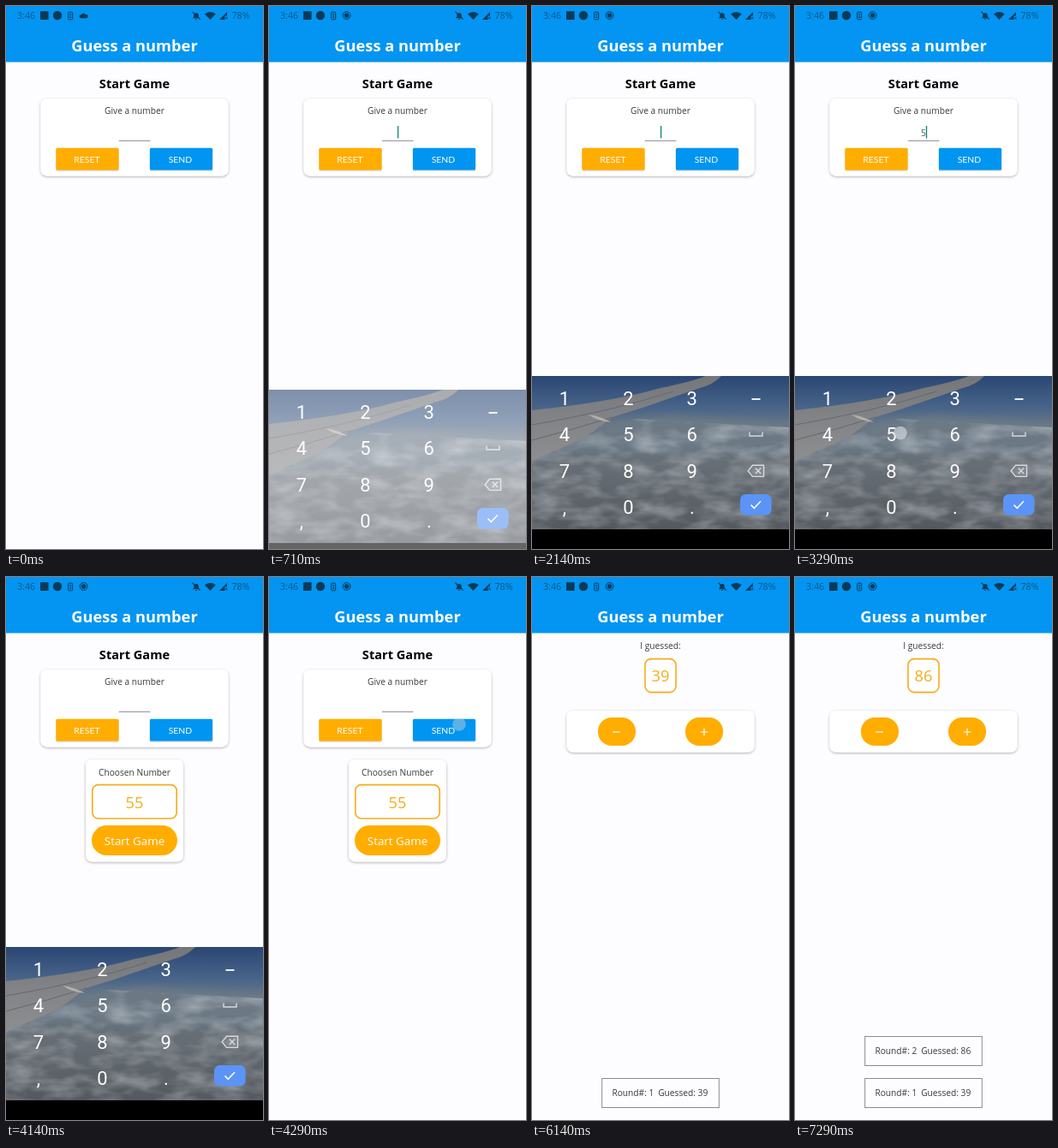
An HTML page for the animation above (8 s loop, 300 by 634 pixels).

```html
<!DOCTYPE html>
<html lang="en">
<head>
<meta charset="utf-8">
<title>Guess a number</title>
<style>
  html, body { margin: 0; width: 100%; height: 100%; overflow: hidden; background: #fdfcfe; }
  svg { display: block; width: 100%; height: 100%; }
  text { font-family: "Open Sans", "Noto Sans", sans-serif; font-size: 10.2px; fill: #3a3a3a; text-anchor: middle; }
  .start { text-anchor: start; }
  .title { font-size: 18.3px; font-weight: 700; fill: #fff; }
  .head { font-size: 14.6px; font-weight: 700; fill: #000; }
  .btn { font-family: Lato, sans-serif; font-size: 10.4px; fill: #fff; }
  .big { font-size: 18.3px; fill: #f5ac1c; }
  .pill { font-size: 13.4px; fill: #fff; }
  .key { font-family: Roboto, sans-serif; font-size: 22px; fill: #fff; }
  .bar { font-size: 10.7px; fill: #0a5688; }
  .card { fill: #fff; filter: url(#lift); }
  .flat { filter: url(#low); }
  .frame { fill: #fff; stroke: #f5ac1c; stroke-width: 1.6; }
  .entry { fill: #fdfcfe; stroke: #8c8c8c; stroke-width: 1; }
</style>
</head>
<body>
<svg viewBox="0 0 300 634" xmlns="http://www.w3.org/2000/svg">
  <defs>
    <filter id="lift" x="-10%" y="-20%" width="120%" height="150%">
      <feDropShadow dx="0" dy="1" stdDeviation="1.5" flood-color="#000" flood-opacity=".33"/>
    </filter>
    <filter id="low" x="-10%" y="-20%" width="120%" height="160%">
      <feDropShadow dx="0" dy=".8" stdDeviation=".7" flood-color="#000" flood-opacity=".3"/>
    </filter>
    <filter id="soft" x="-30%" y="-60%" width="160%" height="220%"><feGaussianBlur stdDeviation="4"/></filter>
    <filter id="fluff" x="0" y="0" width="100%" height="100%">
      <feTurbulence type="fractalNoise" baseFrequency=".025 .06" numOctaves="3" seed="4"/>
      <feColorMatrix values="0 0 0 0 .72  0 0 0 0 .75  0 0 0 0 .78  1.6 0 0 0 -.6"/>
      <feComposite in2="SourceGraphic" operator="in"/>
    </filter>
    <linearGradient id="sky" x1="0" y1="0" x2="0" y2="1">
      <stop offset="0" stop-color="#2a4774"/><stop offset=".2" stop-color="#476388"/>
      <stop offset=".32" stop-color="#667686"/><stop offset=".6" stop-color="#666d74"/><stop offset="1" stop-color="#54595f"/>
    </linearGradient>
    <linearGradient id="wing" x1="0" y1="0" x2="0" y2="1">
      <stop offset="0" stop-color="#74767a"/><stop offset=".5" stop-color="#828386"/><stop offset="1" stop-color="#8d8e90"/>
    </linearGradient>
    <clipPath id="photo"><rect y="432" width="300" height="179"/></clipPath>
  </defs>

  <rect width="300" height="634" fill="#fdfcfe"/>
  <rect width="300" height="65.5" fill="#0395f1"/>

  <g fill="#0b3a58">
    <text class="bar start" x="13" y="15">3:46</text>
    <rect x="40" y="6.2" width="9.6" height="9.8"/>
    <circle cx="60" cy="11" r="5.2"/>
    <rect x="72.7" y="7.2" width="5" height="8.6" rx="1" fill="none" stroke="#0b3a58"/>
    <path d="M74 9.6h2.4M75.2 10v3.4M74 13.4h2.4" stroke="#0b3a58" stroke-width=".8"/>
    <path id="cloud" d="M87.5 14.2a2 2 0 0 1 .2-4 3 3 0 0 1 5.3-.3 2.2 2.2 0 0 1 1 4.3z"/>
    <g id="rec"><circle cx="90.6" cy="11" r="4.4" fill="none" stroke="#0b3a58"/><circle cx="90.6" cy="11" r="2.7"/></g>
    <path d="M218 14.2l1.3-1.6V10a2.8 2.8 0 0 1 5.4 0v2.6l1.3 1.6zM221 15h2a1 1 0 0 1-2 0z"/>
    <path d="M217.4 6.6l9.2 9" stroke="#0b3a58" stroke-width="1.1"/>
    <path d="M232 9.3q6.4-4.6 12.8 0L238.4 16z"/>
    <path d="M249 16L258 7v4.4h-2.6V16z"/><path d="M256.2 12.6l2.2 2.8m0-2.8l-2.2 2.8" stroke="#0b3a58" stroke-width=".8"/>
    <text class="bar start" x="263.5" y="15">78%</text>
  </g>
  <text class="title" x="150" y="53">Guess a number</text>

  <g id="setup">
    <text class="head" x="150" y="96">Start Game</text>
    <rect class="card" x="40.5" y="108" width="219" height="90.5" rx="7.3"/>
    <text x="150" y="125.6">Give a number</text>
    <path d="M131.8 157.4h36.6" stroke="#8f8c98" stroke-width="1"/>
    <text id="typed" x="150" y="151.5" style="fill:#555"></text>
    <rect id="caret" y="140" width="1.4" height="14.5" fill="#17877b"/>
    <rect class="flat" x="58.4" y="165.7" width="73.2" height="25.8" rx="1.5" fill="#ffad00"/>
    <text class="btn" x="94.4" y="182.6">RESET</text>
    <rect class="flat" x="167.9" y="165.7" width="73.2" height="25.8" rx="1.5" fill="#0395f1"/>
    <text class="btn" x="203.4" y="182.6">SEND</text>
  </g>

  <g id="chosen">
    <rect class="card" x="93" y="213" width="114" height="119.5" rx="7.3"/>
    <text x="150" y="231.5">Choosen Number</text>
    <rect class="frame" x="100.8" y="242.6" width="98.4" height="39.4" rx="7"/>
    <text class="big" x="150" y="269.5">55</text>
    <g id="go">
      <rect x="100" y="290" width="100" height="35" rx="17.5" fill="#ffad00"/>
      <text class="pill" x="150" y="312.6">Start Game</text>
    </g>
  </g>

  <g id="game">
    <text x="150" y="84.2">I guessed:</text>
    <rect class="frame" x="132" y="95.6" width="36" height="39" rx="7"/>
    <text class="big" id="guess" x="150" y="122"></text>
    <rect class="card" x="40.5" y="156" width="219" height="48.7" rx="7.3"/>
    <rect x="77" y="164" width="44" height="33" rx="16" fill="#ffad00"/>
    <path d="M94.3 181h8.6" stroke="#fff" stroke-width="1.2"/>
    <g id="plus">
      <rect x="179" y="164" width="44" height="33" rx="16" fill="#ffad00"/>
      <path d="M196.7 181h8.6M201 176.7v8.6" stroke="#fff" stroke-width="1.2"/>
    </g>
    <g id="log"></g>
  </g>

  <g id="board">
    <rect y="432" width="300" height="202" fill="#000"/>
    <g clip-path="url(#photo)">
      <rect y="432" width="300" height="179" fill="url(#sky)"/>
      <path d="M-10 540L100 486l60-7 150 10v30H-10z" fill="#6c7985" filter="url(#soft)"/>
      <path d="M0 525L120 482l180 10v119H0z" fill="#fff" filter="url(#fluff)" opacity=".55"/>
      <path d="M0 472Q95 462 150 446Q190 438 205 431L222 431Q212 442 196 446L126 470 94 480 62 504 0 531z" fill="url(#wing)"/>
      <path d="M0 489Q90 474 165 450M0 507Q50 494 94 480" fill="none" stroke="#66686b" stroke-width="1"/>
      <path d="M66 477q14 2 26 9q-15-1-26-9z" fill="#b0afab"/>
    </g>
    <g id="keys"></g>
    <path d="M256.5 459h10" stroke="#fff" stroke-width="1.8"/>
    <g fill="none" stroke="#d9dadd" stroke-width="1.4">
      <path d="M254 497.5v4.5h15v-4.5"/>
      <path d="M257.5 536.2h13v13.2h-13l-5.3-6.6zM260.8 539.6l6.4 6.4m0-6.4l-6.4 6.4"/>
    </g>
    <rect x="243" y="570" width="36.6" height="24.4" rx="6.5" fill="#5b94f6"/>
    <path d="M255.5 582.5l3.8 3.8 7.6-8" fill="none" stroke="#fff" stroke-width="1.6"/>
  </g>

  <circle id="dot" r="7.8" fill="#cfd3d8"/>
</svg>
<script>
  const $ = id => document.getElementById(id);
  const LOOP = 8000, TICK = 1000 / 7;

  $('keys').innerHTML = ['123', '456', '789', ',0.'].map((row, r) =>
    [...row].map((k, c) =>
      `<text class="key" x="${38 + c * 74.4}" y="${466.2 + r * 42.2}">${k}</text>`).join('')).join('');

  const entry = (round, value, y) => `<g id="round${round}">
    <rect class="entry" x="81.7" y="${y}" width="136.6" height="34"/>
    <text class="start" x="93.4" y="${y + 20.7}">Round#: ${round}</text>
    <text class="start" x="147.2" y="${y + 20.7}">Guessed: ${value}</text></g>`;
  $('log').innerHTML = entry(2, 86, 536.5) + entry(1, 39, 585.5);

  // Taps: first tick, last tick, x, y, opacity
  const taps = [
    [3, 4, 150, 149, .5], [21, 23, 123, 498.5, .7], [25, 25, 123, 498.5, .7],
    [28, 28, 222, 172, .45], [30, 30, 222, 172, .45],
    [34, 34, 168, 311, .45], [48, 49, 212, 188, .45]
  ];

  const show = (id, opacity) => $(id).setAttribute('opacity', Number(opacity));
  const within = (n, a, b) => n >= a && n < b;
  // A pressed button dims, then recovers over three ticks.
  const press = (n, at) => within(n, at, at + 3) ? .4 + (n - at) * .2 : 1;

  function draw(t) {
    const n = Math.min(55, Math.floor((t + 4) / TICK));
    const playing = n >= 35;

    show('cloud', n < 1);
    show('rec', n >= 1);
    show('setup', !playing);
    show('chosen', within(n, 29, 35));
    show('game', playing);

    const text = within(n, 22, 25) ? '5' : within(n, 25, 29) ? '55' : '';
    $('typed').textContent = text;
    $('caret').setAttribute('x', 149.9 + text.length * 2.9);
    show('caret', within(n, 5, 8) || within(n, 12, 16) || within(n, 19, 29));

    // The keyboard fades in while it rises a short way.
    const up = within(n, 5, 30) ? Math.min(1, (n - 4) * .6) : 0;
    show('board', up);
    $('board').setAttribute('transform', `translate(0 ${(1 - up) * 40})`);

    show('go', press(n, 34));
    show('plus', press(n, 48));
    $('guess').textContent = n < 49 ? '39' : '86';
    show('round2', n >= 49);

    const tap = taps.find(([a, b]) => n >= a && n <= b);
    show('dot', tap ? tap[4] : 0);
    if (tap) {
      $('dot').setAttribute('cx', tap[2]);
      $('dot').setAttribute('cy', tap[3]);
    }
  }

  const begin = performance.now();
  function loop() {
    draw((performance.now() - begin) % LOOP);
    requestAnimationFrame(loop);
  }
  draw(0);
  requestAnimationFrame(loop);
</script>
</body>
</html>
```
